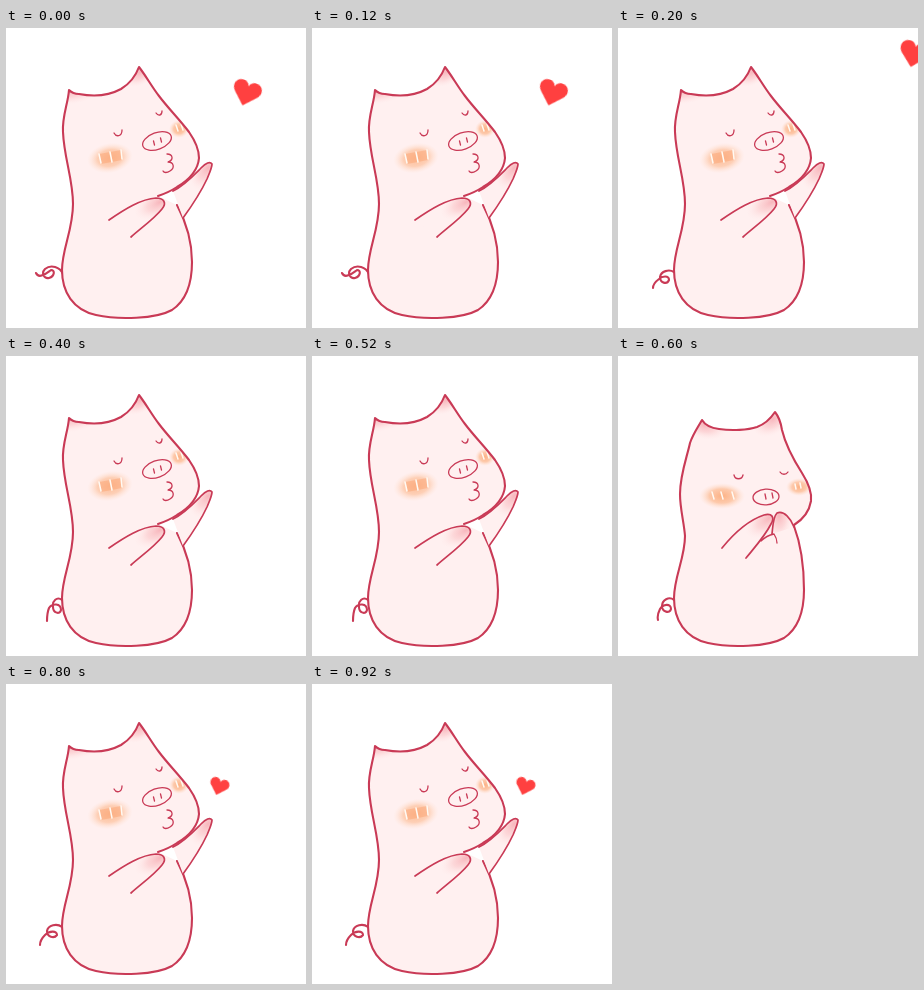
An HTML page that plays this animation: 300 px wide and 300 px high, repeating every 1000 ms.

```html
<!DOCTYPE html>
<html lang="en">
<head>
<meta charset="utf-8">
<title>Piglet blowing a kiss</title>
<style>
  html, body { margin: 0; width: 100%; height: 100%; overflow: hidden; background: #fff; }
  svg { display: block; width: 100vw; height: 100vh; }
  .line { fill: none; stroke: #c93a56; stroke-width: 1.7; stroke-linecap: round; stroke-linejoin: round; }
  .bold { stroke-width: 2.1; }
  .thin { stroke-width: 1.3; }
  .skin { fill: #fff0f0; }
  .shine { fill: none; stroke: #fffaf4; stroke-width: 1.5; stroke-linecap: round; }
  .heart { fill: #ff4040; }
  .step { opacity: 0; }
</style>
</head>
<body>
<svg viewBox="0 0 300 300">
  <defs>
    <radialGradient id="blush">
      <stop offset="0" stop-color="#fcb184"/>
      <stop offset=".55" stop-color="#fdc3a0" stop-opacity=".85"/>
      <stop offset="1" stop-color="#ffe2d2" stop-opacity="0"/>
    </radialGradient>
    <radialGradient id="rose">
      <stop offset="0" stop-color="#f5a3ab" stop-opacity=".75"/>
      <stop offset=".5" stop-color="#fabfc2" stop-opacity=".5"/>
      <stop offset="1" stop-color="#ffe4e4" stop-opacity="0"/>
    </radialGradient>
    <path id="heart" d="M0 13L-12 1C-17-5-13-12-7-12C-3-12-1-10 0-7C1-10 3-12 7-12C13-12 17-5 12 1Z"/>

    <path id="bodyA" d="M171 177C179 192 186 210 186 234C186 258 178 274 166 282C150 291 112 292 90 287C67 282 56 264 56 242C56 221 67 202 67 176C67 151 58 130 57 104C56 88 62 76 63 62C66 65 69 66 73 66C89 69 104 67 115 61C125 55 130 47 133 39C140 48 146 59 153 68C162 80 174 92 183 104C190 114 193 122 193 130C192 143 181 153 171 159C165 163 158 166 152 168"/>
    <path id="armA" d="M167 163C179 157 189 146 195 140C200 135 204 133 206 136C206 140 203 146 201 151C194 166 185 179 177 190"/>
    <path id="handA" d="M103 192C119 181 135 171 150 170C158 170 161 175 156 181C148 191 135 200 125 209"/>
    <clipPath id="clipA"><use href="#bodyA"/></clipPath>
    <clipPath id="clipArmA"><use href="#armA"/></clipPath>
    <clipPath id="clipHandA"><use href="#handA"/></clipPath>

    <path id="bodyB" d="M176 170C182 186 186 208 186 234C186 258 178 274 166 282C150 291 112 292 90 287C67 282 56 264 56 242C56 221 67 202 67 180C66 166 62 153 62 138C62 119 69 101 72 87C75 78 80 71 84 64C87 69 93 72 101 73C114 75 130 74 139 71C147 68 153 62 157 56C161 61 163 67 164 74C168 91 177 106 184 117C191 128 194 137 193 145C191 157 184 164 176 169"/>
    <path id="handB" d="M104 192C117 176 131 164 146 159C154 157 157 161 153 168C147 180 137 191 128 202"/>
    <path id="palmB" d="M154 178C155 169 155 161 159 157C166 154 173 163 176 171"/>
    <clipPath id="clipB"><use href="#bodyB"/></clipPath>
    <clipPath id="clipHandB"><use href="#handB"/></clipPath>
    <clipPath id="clipPalmB"><use href="#palmB"/></clipPath>
  </defs>

  <g id="tails" class="line bold"></g>

  <g id="kiss" class="step">
    <use href="#bodyA" class="skin"/>
    <g clip-path="url(#clipA)">
      <ellipse cx="66" cy="62" rx="31" ry="14" fill="url(#rose)" transform="rotate(-7 66 62)"/>
      <ellipse cx="134" cy="44" rx="20" ry="13" fill="url(#rose)" transform="rotate(-30 134 44)"/>
      <ellipse cx="173" cy="101" rx="10" ry="9" fill="url(#blush)"/>
    </g>
    <ellipse cx="104" cy="130" rx="23" ry="15" fill="url(#blush)" opacity=".85" transform="rotate(-10 104 130)"/>
    <path fill="#fca878" opacity=".55" d="M93 126L115 122L116 132L95 136Z"/>
    <path class="shine" d="M93 126L95 135M104 124L106 134M115 122L116 131M170 97L172 103M175 96L177 102"/>
    <use href="#bodyA" class="line bold"/>
    <use href="#armA" class="skin"/>
    <g clip-path="url(#clipArmA)"><ellipse cx="202" cy="140" rx="25" ry="14" fill="url(#rose)" transform="rotate(-55 202 140)"/></g>
    <use href="#armA" class="line"/>
    <use href="#handA" class="skin"/>
    <g clip-path="url(#clipHandA)"><ellipse cx="154" cy="174" rx="28" ry="14" fill="url(#rose)" transform="rotate(-28 154 174)"/></g>
    <use href="#handA" class="line"/>
    <g class="line thin">
      <path d="M108 105C110 109 116 109 116 102M150 85C152 88 156 88 156 83"/>
      <ellipse cx="151" cy="113" rx="15" ry="8.3" transform="rotate(-20 151 113)"/>
      <path d="M147.5 113L148.5 117M154.5 110L155.5 114"/>
      <path d="M161 126C167 126 168 132 162 134C168 134 169 140 164 143C161 145 158 145 157 143"/>
    </g>
  </g>

  <g id="gather" class="step">
    <use href="#bodyB" class="skin"/>
    <g clip-path="url(#clipB)">
      <ellipse cx="86" cy="69" rx="24" ry="14" fill="url(#rose)" transform="rotate(15 86 69)"/>
      <ellipse cx="155" cy="63" rx="23" ry="15" fill="url(#rose)" transform="rotate(-35 155 63)"/>
      <ellipse cx="181" cy="131" rx="13" ry="9" fill="url(#blush)"/>
    </g>
    <ellipse cx="104" cy="140" rx="23" ry="13" fill="url(#blush)"/>
    <path class="shine" d="M94 136L96 143M103 136L105 143M114 136L116 143M177 128L178 133M182 127L183 132"/>
    <use href="#bodyB" class="line bold"/>
    <use href="#palmB" class="skin"/>
    <g clip-path="url(#clipPalmB)"><ellipse cx="161" cy="160" rx="14" ry="24" fill="url(#rose)"/></g>
    <use href="#palmB" class="line"/>
    <use href="#handB" class="skin"/>
    <g clip-path="url(#clipHandB)"><ellipse cx="151" cy="162" rx="28" ry="15" fill="url(#rose)" transform="rotate(-38 151 162)"/></g>
    <use href="#handB" class="line"/>
    <path class="line thin" d="M143 185C147 181 151 179 156 178C158 181 159 184 159 187"/>
    <g class="line thin">
      <path d="M116 119C117 124 124 124 125 119M162 116C164 119 168 119 170 116"/>
      <ellipse cx="148" cy="141" rx="13" ry="7.8" transform="rotate(-4 148 141)"/>
      <path d="M147 138L148 143M154 137L155 142"/>
    </g>
  </g>

  <g id="hearts" class="heart"></g>
</svg>
<script>
  const LOOP = 1000, STEPS = 5;
  const el = id => document.getElementById(id);

  // Show a part only during the listed steps of the loop.
  function showOn(part, steps) {
    const frames = [];
    for (let i = 0; i < STEPS; i++)
      frames.push({ offset: i / STEPS, opacity: steps.includes(i) ? 1 : 0, easing: 'steps(1, end)' });
    frames.push({ ...frames[STEPS - 1], offset: 1 });
    part.animate(frames, { duration: LOOP, iterations: Infinity });
  }

  function add(parent, tag, attrs, steps) {
    const part = document.createElementNS('http://www.w3.org/2000/svg', tag);
    for (const key in attrs) part.setAttribute(key, attrs[key]);
    part.setAttribute('class', 'step');
    el(parent).append(part);
    showOn(part, steps);
  }

  showOn(el('kiss'), [0, 1, 2, 4]);
  showOn(el('gather'), [3]);

  const tails = [
    'M57 246C54 239 45 236 39 241C35 245 38 251 43 250C49 248 49 242 45 242C42 244 33 252 30 245',
    'M56 244C51 241 43 243 42 249C42 255 49 257 51 252C51 247 44 248 41 251C37 254 35 257 35 260',
    'M56 244C51 240 46 245 47 251C47 257 54 259 55 254C55 247 46 247 43 252C41 257 41 261 41 265',
    'M56 244C51 240 44 244 44 250C44 256 52 258 53 253C53 247 45 248 42 253C40 257 39 260 40 264',
    'M56 243C51 239 42 241 41 247C41 253 48 255 51 251C51 246 43 247 39 251C36 254 34 258 34 261'
  ];
  tails.forEach((d, i) => add('tails', 'path', { d }, [i]));

  // step, x, y, scale, tilt
  [[4, 213, 102.5, 0.68, 18], [0, 240.5, 65, 1, 18], [1, 296, 26, 1.03, 14]]
    .forEach(([step, x, y, scale, tilt]) => add('hearts', 'use', {
      href: '#heart', transform: `translate(${x} ${y}) rotate(${tilt}) scale(${scale})`
    }, [step]));
</script>
</body>
</html>
```
